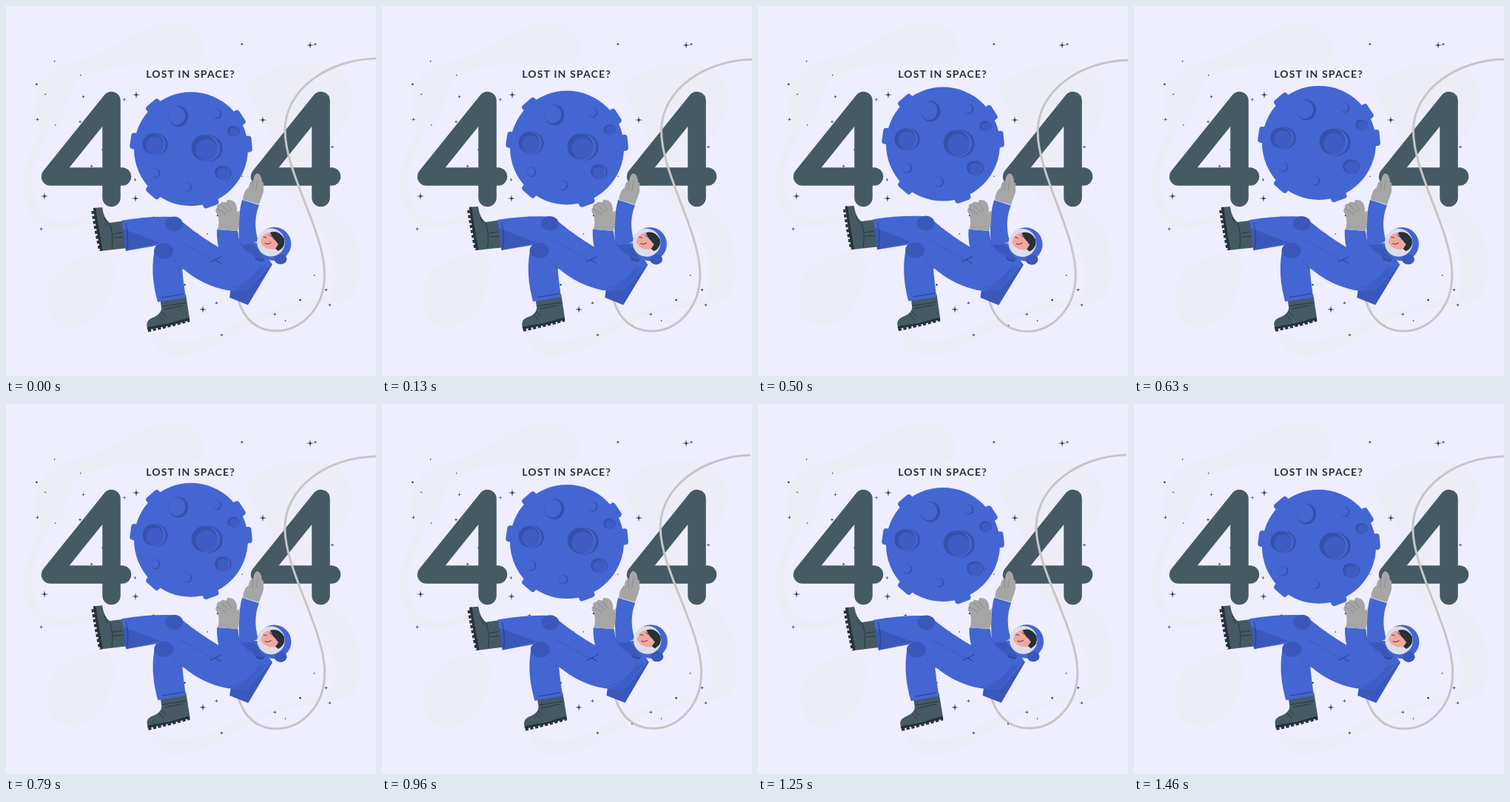
Recreate the animation shown at these times as an HTML page. Size 500x500 px, loop 1500 ms.

```html
<!DOCTYPE html>
<html lang="en">
<head>
<meta charset="utf-8">
<title>Lost in space</title>
<style>
  html, body { margin: 0; width: 100%; height: 100%; overflow: hidden; background: #efeeff; }
  svg { display: block; width: 100vw; height: 100vh; }
  text { font: 700 14px Lato, sans-serif; letter-spacing: 1.15px; fill: #263238; }
  .suit { fill: #4366d3; }
  .shade { fill: #3a57ba; }
  .boot { fill: #455a64; }
  .glove { fill: #a6a6a6; }
  .fold, .seam, .finger, .crease { fill: none; stroke-width: .9; stroke-linecap: round; }
  .fold { stroke: #263a7c; }
  .seam { stroke: #3a57ba; }
  .finger { stroke: #858585; }
  .crease { stroke: #263238; }
  .sole, .tread { fill: none; stroke: #263238; stroke-width: 3.4; }
  .tread { stroke-dasharray: 4.2 2.6; }
  .four { fill: none; stroke: #455a64; stroke-width: 24.5; stroke-linecap: round; stroke-linejoin: round; }
  .haze { fill: #ededf7; }
</style>
</head>
<body>
<svg viewBox="0 0 500 500">
  <g class="sway haze">
    <path d="M40 150C36 105 55 80 95 74C140 68 165 30 220 24C262 20 276 48 265 74C240 90 150 70 105 95C75 115 90 150 60 168C30 215 30 262 52 282C70 298 105 290 140 270L142 282C95 302 60 312 38 288C18 262 18 215 48 168Z"/>
    <path d="M57 400C50 360 85 344 118 335C145 328 154 348 143 380C134 412 118 433 92 435C68 436 57 425 57 400Z"/>
    <path d="M325 110C345 80 400 70 440 82C470 92 474 130 458 160C446 185 405 200 400 225C398 260 450 268 468 300C482 335 480 375 470 392C450 406 400 404 360 418C310 436 290 466 240 474C208 478 190 455 196 425C202 452 232 460 270 448C320 420 360 408 440 390C450 360 440 310 410 285C380 262 355 240 362 205C368 165 330 145 325 110Z"/>
  </g>
  <g id="stars" fill="#2d3650"></g>
  <text x="189.2" y="97">LOST IN SPACE?</text>
  <path class="four" d="M142.5 128V259M157 230.5H60L142.5 128"/>
  <path class="four" d="M425.5 128V259M440 230.5H343L425.5 128"/>
  <g id="moon"></g>

  <g class="sway">
    <path d="M500 71C436 72 377 112 377 168C377 225 430 304 430.5 362C431 408 399 439 365 439C340 439 322 424 314 398" fill="none" stroke="#c6c6c6" stroke-width="3"/>

    <!-- far arm -->
    <path class="suit" d="M319 262L342 269Q333 292 341 318L316 326Q312 288 319 262Z"/>
    <path class="glove" d="M320 262L342 268L348 251V239L346 238Q345 226 339 226Q335 228 334 236Q329 236 328 245Q321 249 320 262Z"/>
    <path class="finger" d="M334 237L333 248M340 236L338 248"/>

    <!-- boots -->
    <path class="tread" d="M117 277Q121 304 127 331"/>
    <path class="boot" d="M118 273L130 272Q132 287 140 293L162 290L164 327L129 331Q124 303 118 273Z"/>
    <path class="sole" d="M119.5 273Q124 303 129 331"/>
    <path class="crease" d="M140 294Q146 310 143 328M145 308L157 306M146 313L158 312M133 286L137 296"/>
    <path class="tread" d="M192 439Q220 433 248 425"/>
    <path class="boot" d="M208 394L243 390L248 422L191 435Q188 426 196 422Q210 417 210 408Z"/>
    <path class="sole" d="M191 436Q220 431 248 423"/>
    <path class="crease" d="M211 406L243 401M214 410L238 405M210 414L216 420M207 418L212 424"/>

    <!-- backpack -->
    <path class="shade" d="M346 340L360 349L327 404L302 394L304 380Z"/>

    <!-- raised leg -->
    <path class="suit" d="M156 290Q190 284 226 285L240 293C252 303 275 320 304 335L290 380L232 345Q222 322 214 322L162 331Q160 310 156 290Z"/>
    <path class="shade" d="M158 301L208 320L162 331Z"/>
    <ellipse class="shade" cx="227" cy="294.5" rx="12" ry="10"/>
    <path class="fold" d="M162 294Q166 310 164 328"/>

    <!-- torso and lowered leg -->
    <path class="suit" d="M200 334C203 319 220 317 234 322L280 344Q302 331 314 320L340 320L359 348L328 384Q312 386 298 384Q264 377 238 354Q240 376 243 394L205 400Q195 365 200 334Z"/>
    <ellipse class="shade" cx="213" cy="331" rx="13" ry="10.5"/>
    <path class="shade" d="M304 385Q328 376 342 354L352 352L328 384Z" opacity=".5"/>
    <path class="seam" d="M234 318Q262 334 284 345M300 383Q330 376 344 352M226 342Q230 350 240 356"/>
    <path class="fold" d="M276 346Q290 340 296 335M283 343L290 348M298 338Q312 340 322 345M211 394Q226 392 240 389"/>

    <!-- collar and near arm -->
    <path class="shade" d="M314 323L334 322L352 339L346 346L330 342Z"/>
    <path class="fold" d="M320 326L332 337M335 340Q342 344 348 344"/>
    <path class="suit" d="M285 302L313 304Q312 324 334 336L340 347L302 352Q284 336 285 302Z"/>
    <path class="seam" d="M313 306Q313 326 334 338"/>
    <path class="glove" d="M286 302L313 304Q317 290 315 276L312 279Q313 263 302 262Q298 261 298 266Q291 263 290 267Q284 267 285 273Q281 276 286 282Q289 292 286 302Z"/>
    <path class="finger" d="M298 266L305 276M290 268L301 278M285 274L297 281"/>

    <!-- helmet -->
    <circle class="suit" cx="362.5" cy="321.5" r="22.8"/>
    <ellipse class="shade" cx="371" cy="342" rx="8.5" ry="7"/>
    <ellipse cx="358" cy="319.5" rx="18.8" ry="19" fill="#dcdde8"/>
    <path d="M344 319Q346 308 355 306Q366 304 370 312Q373 325 362 329Q348 329 344 319Z" fill="#f2a6a0"/>
    <path d="M357 306Q369 302 376 315Q378 326 368 331L364 328L368 322L364 317Q360 314 357 306Z" fill="#263238"/>
    <path class="crease" d="M348 312L352 313M356 309L359 312M350 321Q354 323 358 320"/>
  </g>
</svg>
<script>
const BLUE = '#4366d3', DARK = '#3651ab', FLOOR = '#3d5dc4', LOOP = 1500;
const moon = document.getElementById('moon');
const stars = document.getElementById('stars');
const swaying = document.querySelectorAll('.sway');

function add(parent, tag, attrs) {
  const node = document.createElementNS('http://www.w3.org/2000/svg', tag);
  for (const key in attrs) node.setAttribute(key, attrs[key]);
  parent.append(node);
}

const ellipse = (cx, cy, rx, ry, fill) => add(moon, 'ellipse', { cx, cy, rx, ry, fill });

function sparkle(x, y, r) {
  const n = r * .16, m = r - n;
  add(stars, 'path', {
    d: `M${x} ${y - r}l${n} ${m} ${m} ${n} ${-m} ${n} ${-n} ${m} ${-n} ${-m} ${-m} ${-n} ${m} ${-n}z`
  });
}

// Bright sparkles stand at fixed places, the small stars are scattered
[[411, 53], [176, 120], [347, 154], [52, 257], [175, 260], [266, 410]].forEach(([x, y]) => sparkle(x, y, 5));

let seed = 404;
const random = () => (seed = seed * 16807 % 2147483647) / 2147483647;
for (let i = 0; i < 38; i++) {
  const x = 40 + 420 * random(), y = 50 + 395 * random();
  if (i % 2) sparkle(x, y, 2.8);
  else add(stars, 'circle', { cx: x, cy: y, r: i % 3 ? .8 : 1.3 });
}

// Moon with bumps along its edge
ellipse(250, 193.3, 77, 77, BLUE);
for (const angle of [-33, -5, 70, 131, 188, 229])
  add(moon, 'rect', {
    x: 250, y: 182.3, width: 82.5, height: 22, rx: 4, fill: BLUE, transform: `rotate(${angle} 250 193.3)`
  });

function deepCrater(x, y, r) {
  ellipse(x + r * .2, y, r * 1.08, r, DARK);
  ellipse(x + r * .06, y, r * 1.04, r * .98, BLUE);
  ellipse(x - r * .06, y - r * .04, r * .94, r * .94, DARK);
  ellipse(x + r * .1, y + r * .1, r * .78, r * .78, FLOOR);
}
function shallowCrater(x, y, r) {
  ellipse(x, y, r * .95, r, DARK);
  ellipse(x - r * .14, y - r * .06, r * .8, r * .88, BLUE);
}
deepCrater(269, 192.5, 18.5);
deepCrater(199.5, 187, 15);
deepCrater(292, 225.5, 10);
deepCrater(306.5, 169, 7.2);
shallowCrater(233, 149, 14);
shallowCrater(285, 146, 6.7);
shallowCrater(245, 244.5, 6.5);
shallowCrater(202, 226, 6.7);

// Triangle wave: 0 at the start of a loop, 1 at its middle
const triangle = t => 1 - Math.abs(1 - 2 * (t % 1));

function draw(now) {
  const t = now / LOOP;
  const angle = 2 * triangle(t + .25) - 1;
  moon.setAttribute('transform', `translate(0 ${-10 * triangle(t)})`);
  swaying.forEach(g => g.setAttribute('transform', `rotate(${angle} 307 255)`));
  requestAnimationFrame(draw);
}
requestAnimationFrame(draw);
</script>
</body>
</html>
```
